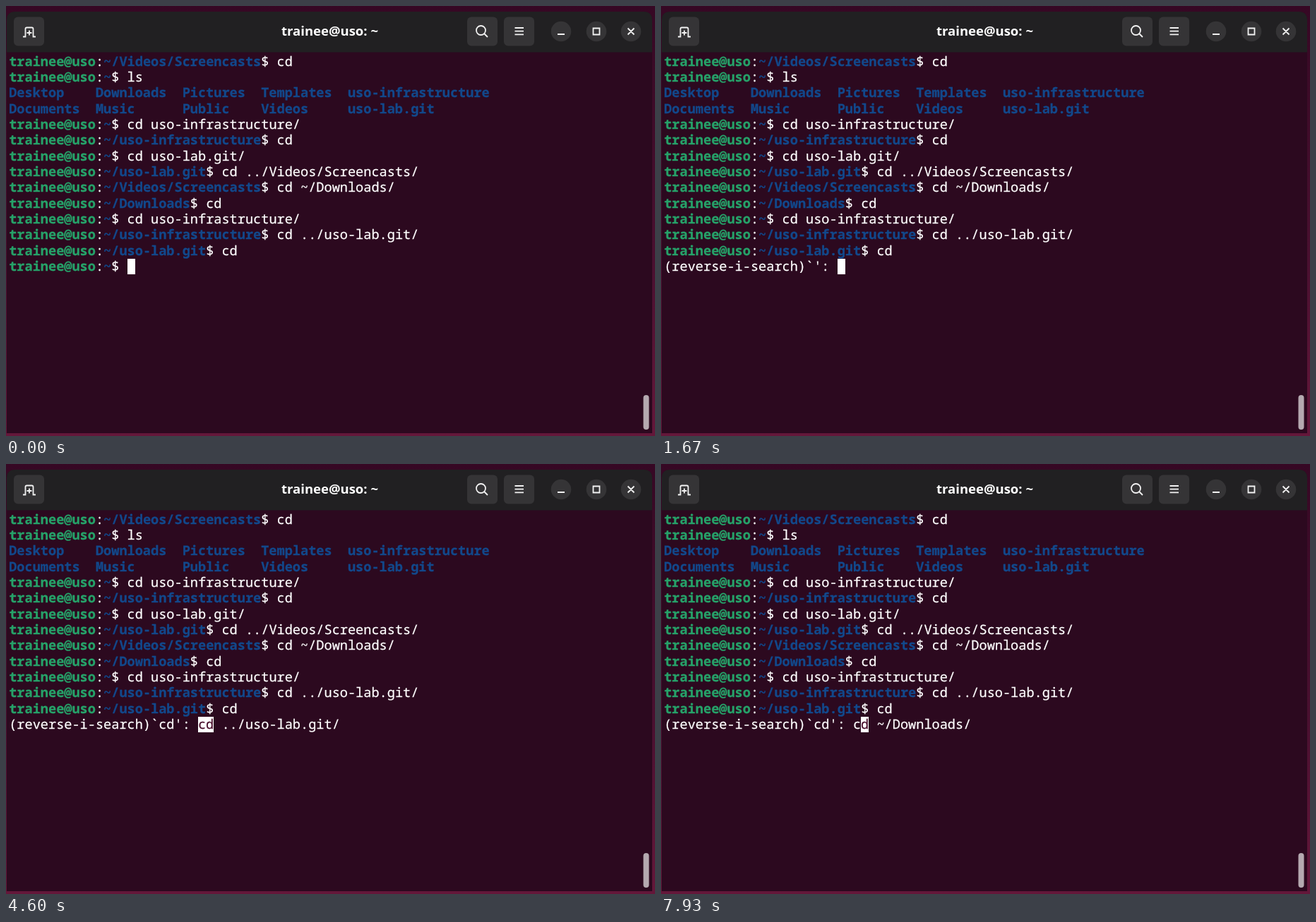
Write an HTML page that moves like this. It is 919x609 px and loops after 8 s.

```html
<!DOCTYPE html>
<html lang="en">
<meta charset="utf-8">
<title>Terminal</title>
<style>
  html, body { margin: 0; width: 100%; height: 100%; overflow: hidden; background: #380a26; }
  svg { position: absolute; left: 0; top: 0; }
  pre {
    position: absolute; left: 4.2px; top: 67.6px; margin: 0; color: #fff;
    font: 18.6px/22.35px "Noto Sans Mono", monospace;
    -webkit-text-stroke: .25px; text-rendering: geometricPrecision;
  }
  b { color: #26a269; }
  b.dir { color: #12488b; }
  i { display: inline-block; vertical-align: top; height: 22.35px; font-style: normal; background: #fff; color: #4a0f2c; }
</style>
<svg width="919" height="609" viewBox="0 0 919 609">
  <defs>
    <linearGradient id="wall" x2="0" y2="1">
      <stop offset="0" stop-color="#360824"/>
      <stop offset=".6" stop-color="#4a1030"/>
      <stop offset="1" stop-color="#64173a"/>
    </linearGradient>
  </defs>
  <rect width="919" height="609" fill="url(#wall)"/>
  <path d="M1 605V20Q1 8 13 8H903Q915 8 915 20V605Z" fill="#2c091f"/>
  <path d="M1 65.5V20Q1 8 13 8H903Q915 8 915 20V65.5Z" fill="#212022"/>
  <g fill="#353436">
    <rect x="11" y="15.5" width="43" height="41" rx="6"/>
    <rect x="653" y="15.5" width="43" height="41" rx="6"/>
    <rect x="705" y="15.5" width="43" height="41" rx="6"/>
    <circle cx="786" cy="36" r="14.3"/>
    <circle cx="836" cy="36" r="14.3"/>
    <circle cx="885" cy="36" r="14.3"/>
  </g>
  <g fill="none" stroke="#f2f2f2" stroke-width="1.8">
    <path d="M24 43.5h3.5v-11q0-2 2-2h7q2 0 2 2v11h3.5M33 34.5v7M29.5 38h7"/>
    <circle cx="672.5" cy="34.5" r="6.5"/>
    <path d="M677 39l5 5M720.5 31h12.5M720.5 35.7h12.5M720.5 40.4h12.5"/>
    <path d="M781 40h10M831.5 31.5h9v9h-9zM880.5 31.5l9 9M889.5 31.5l-9 9"/>
  </g>
  <text x="458.5" y="42" text-anchor="middle" fill="#fff" font-family="Noto Sans, sans-serif" font-size="18.5" font-weight="700">trainee@uso: ~</text>
  <rect x="902.5" y="551" width="8" height="49" rx="4" fill="#b5a9b0"/>
</svg>
<pre id="history"></pre>
<pre id="line" style="top:358px"></pre>
<script>
const infra = 'uso-infrastructure', lab = 'uso-lab.git', casts = '~/Videos/Screencasts';
const dir = text => `<b class="dir">${text}</b>`;
const prompt = (path, command = '') => `<b>trainee@uso</b>:${dir(path)}$ ${command}`;
const columns = (...names) => dir(names.map((n, k) => n.padEnd([11, 11, 10, 11, 0][k])).join(''));

document.getElementById('history').innerHTML = [
  prompt(casts, 'cd'),
  prompt('~', 'ls'),
  columns('Desktop', 'Downloads', 'Pictures', 'Templates', infra),
  columns('Documents', 'Music', 'Public', 'Videos', lab),
  prompt('~', `cd ${infra}/`),
  prompt(`~/${infra}`, 'cd'),
  prompt('~', `cd ${lab}/`),
  prompt(`~/${lab}`, 'cd ../Videos/Screencasts/'),
  prompt(casts, 'cd ~/Downloads/'),
  prompt('~/Downloads', 'cd'),
  prompt('~', `cd ${infra}/`),
  prompt(`~/${infra}`, `cd ../${lab}/`),
  prompt(`~/${lab}`, 'cd')
].join('\n');

const cursor = '<i> </i>';
const empty = "(reverse-i-search)`': ";
// The lit cursor inverts the first letter of the match back to normal.
const match = (rest, lit) => "(reverse-i-search)`cd': " + (lit ? 'c<i>d</i>' : '<i>cd</i>') + rest;

const cues = [
  [0, prompt('~', cursor)],
  [400, prompt('~')],
  [1000, prompt('~', cursor)],
  [1670, empty + cursor],
  [2270, empty],
  [2870, empty + cursor],
  [3800, match('', true)],
  [4000, match(` ../${lab}/`, true)],
  [4600, match(` ../${lab}/`, false)],
  [5000, match(` ../${lab}/`, true)],
  [5600, match(` ${infra}/`, false)],
  [5870, match('', true)],
  [6470, match('', false)],
  [6730, match(' ~/Downloads/', true)],
  [7330, match(' ~/Downloads/', false)],
  [7930, match(' ~/Downloads/', true)]
];

const line = document.getElementById('line');
const start = performance.now();
let shown;
function draw() {
  const t = (performance.now() - start) % 8000;
  const cue = cues.findLast(([at]) => at <= t);
  if (cue !== shown) line.innerHTML = (shown = cue)[1];
  requestAnimationFrame(draw);
}
draw();
</script>
</html>
```
